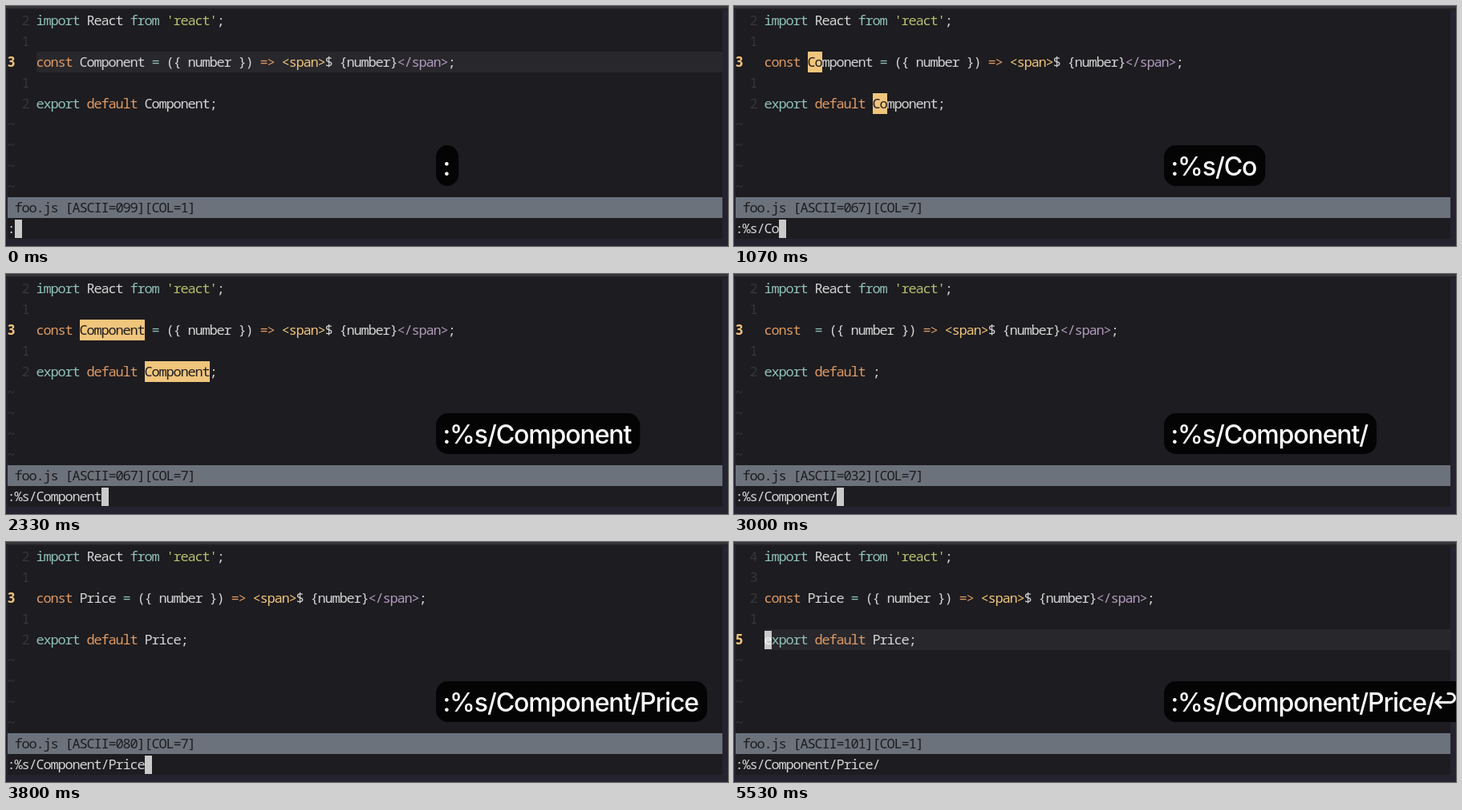
Recreate the animation shown at these times as an HTML page. Size 900 by 300 pixels, loop 5.59 s.

```html
<!DOCTYPE html>
<html lang="en">
<head>
<meta charset="utf-8">
<title>Substitute preview</title>
<style>
  html, body { margin: 0; width: 100%; height: 100%; overflow: hidden; background: #252330; }
  svg { display: block; width: 900px; height: 300px; }
  #screen text {
    font: 400 17px "Noto Sans Mono", "DejaVu Sans Mono", monospace;
    font-stretch: 87.5%;
    font-variant-ligatures: none;
    text-anchor: middle;
  }
  #screen .current { font-weight: 700; }
  #keys {
    font: 500 32px Inter, sans-serif;
    font-optical-sizing: none;
    letter-spacing: -1.1px;
    fill: #fff;
  }
</style>
</head>
<body>
<svg viewBox="0 0 900 300">
  <rect width="900" height="300" fill="#252330"/>
  <rect width="900" height="3" fill="#36363a"/>
  <rect y="3" width="900" height="2" fill="#212024"/>
  <rect x="2" y="5" width="891" height="286" fill="#1d1c20"/>
  <g id="screen"></g>
  <rect id="bubble" x="536" y="174" height="51" rx="15" fill="#040405"/>
  <text id="keys" x="544.5" y="212"></text>
  <path id="enter" d="M881 194 875 200.5 881 207M876 200.5H893a5.5 5.5 0 0 0 0-11H890"
    fill="none" stroke="#fff" stroke-width="3" stroke-linecap="round" stroke-linejoin="round"/>
</svg>
<script>
const LOOP = 5590;
const COMMAND = ':%s/Component/Price/';
const PREFIX = ':%s/'.length;
const WORD = 'Component';
const REPLACE_AT = PREFIX + WORD.length + 1;
const CELL = 9, LINE = 26, LEFT = 2, TOP = 5, GUTTER = 4;

// Time of each key press; the last one is Enter.
const KEY_TIMES = [0, 270, 470, 670, 870, 1070, 1330, 1530, 1730, 1930, 2070,
  2200, 2330, 2800, 3130, 3270, 3400, 3470, 3600, 3930, 4130];

const color = {
  fg: '#d4d5d4', dark: '#1d1c20', dim: '#37363b', teal: '#8fc1ba', orange: '#de9a65',
  yellow: '#f0c57c', green: '#b7bf6c', purple: '#b09abb',
  line: '#28272c', status: '#6c727b', cursor: '#cacaca'
};

const byId = id => document.getElementById(id);
const screen = byId('screen'), bubble = byId('bubble');
const keys = byId('keys'), enter = byId('enter');

function add(tag, attributes) {
  const node = document.createElementNS('http://www.w3.org/2000/svg', tag);
  for (const name in attributes) node.setAttribute(name, attributes[name]);
  screen.append(node);
  return node;
}

function block(row, col, width, fill) {
  add('rect', { x: LEFT + col * CELL, y: TOP + row * LINE, width, height: LINE, fill });
}

function cursor(row, col) {
  add('rect', {
    x: LEFT + col * CELL, y: TOP + row * LINE + 2,
    width: CELL, height: 23, fill: color.cursor
  });
}

// Writes a string on the character grid.
function put(row, col, string, fill = color.fg, style = '') {
  const cells = [...string].map((char, i) => ({ char, x: LEFT + (col + i + .5) * CELL }))
    .filter(cell => cell.char !== ' ');
  if (!cells.length) return;
  const x = cells.map(cell => cell.x).join(' ');
  add('text', { x, y: TOP + row * LINE + 19, fill, class: style })
    .textContent = cells.map(cell => cell.char).join('');
}

function putTokens(row, tokens) {
  let col = GUTTER;
  for (const [string, fill, back] of tokens) {
    if (back && string) block(row, col, string.length * CELL, back);
    put(row, col, string, fill);
    col += string.length;
  }
}

function nameTokens(count) {
  if (count >= REPLACE_AT) return [[COMMAND.slice(REPLACE_AT, count).replace('/', '')]];
  const matched = Math.max(0, count - PREFIX);
  return [[WORD.slice(0, matched), color.dark, color.yellow], [WORD.slice(matched)]];
}

function drawScreen(count) {
  const done = count > COMMAND.length;
  const searching = count > PREFIX && !done;
  const current = done ? 4 : 2;
  screen.replaceChildren();

  if (!searching) block(current, GUTTER, 893 - LEFT - GUTTER * CELL, color.line);
  if (done) cursor(current, GUTTER);
  else cursor(10, count);

  for (let row = 0; row < 5; row++) {
    if (row === current) put(row, 0, String(row + 1), color.yellow, 'current');
    else put(row, 2, String(Math.abs(row - current)), color.dim);
  }
  for (let row = 5; row < 9; row++) put(row, 0, '~', color.dim);

  const name = nameTokens(count);
  putTokens(0, [['import', color.teal], [' React '], ['from', color.teal], [' '],
    ["'react'", color.green], [';']]);
  putTokens(2, [['const', color.orange], [' '], ...name, [' '], ['=', color.teal],
    [' ({ number }) '], ['=>', color.orange], [' '], ['<span>', color.yellow],
    ['$ {number}'], ['</span>', color.purple], [';']]);
  putTokens(4, [['e', done ? '#f2f2f2' : color.teal], ['xport', color.teal], [' '],
    ['default', color.orange], [' '], ...name, [';']]);

  let ascii = '099';
  if (done) ascii = '101';
  else if (count > REPLACE_AT) ascii = '080';
  else if (count === REPLACE_AT) ascii = '032';
  else if (searching) ascii = '067';
  block(9, 0, 891, color.status);
  put(9, 1, `foo.js [ASCII=${ascii}][COL=${searching ? 7 : 1}]`, color.dark);
  put(10, 0, COMMAND.slice(0, count));
}

function drawKeys(count) {
  const done = count > COMMAND.length;
  keys.textContent = COMMAND.slice(0, count);
  bubble.setAttribute('width', keys.getComputedTextLength() + (done ? 60 : 19.5));
  enter.setAttribute('visibility', done ? 'visible' : 'hidden');
}

let shown = 0;
const start = performance.now();

function update() {
  const time = (performance.now() - start) % LOOP;
  const count = KEY_TIMES.filter(pressed => pressed <= time).length;
  if (count !== shown) {
    drawScreen(count);
    drawKeys(count);
    shown = count;
  }
  requestAnimationFrame(update);
}
update();
</script>
</body>
</html>
```
